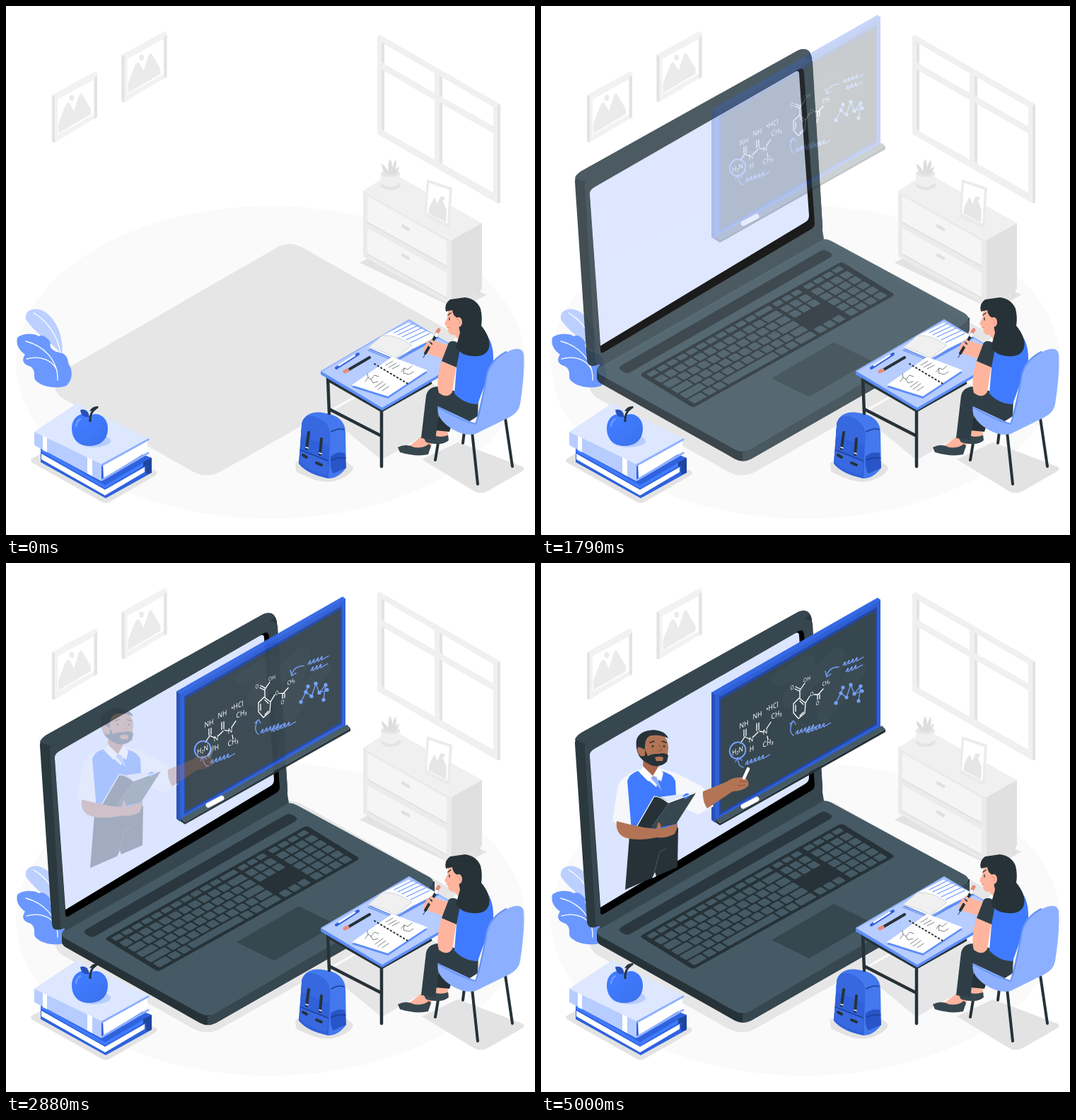
Animation, 748 px wide and 748 px high, one loop 5040 ms. Source, as an HTML page:

```html
<!DOCTYPE html>
<html lang="en">
<head>
<meta charset="utf-8">
<title>Online lesson</title>
<style>
html, body { margin: 0; height: 100%; overflow: hidden; background: #fff; }
svg { display: block; width: 100vw; height: 100vh; }
.line { fill: none; stroke-linecap: round; stroke-linejoin: round; }
text { font: 10.5px "Noto Sans", "Open Sans", sans-serif; fill: #fff; text-anchor: middle; }
</style>
</head>
<body>
<svg viewBox="0 0 748 748">
<defs>
  <g id="picture">
    <path fill="#f2f2f2" d="M65 126 125 93 129 94V157L69 193 65 192Z"/>
    <path fill="#e3e3e3" d="M65 126 69 128V193L65 192ZM125 101 129 98V157L125 160Z"/>
    <path fill="#fff" d="M73 132 124 104V153L73 182Z"/>
    <path fill="#ebebeb" d="M74 180V166L84 141Q88 133 91 139L96 149 103 127Q106 120 109 127L120 146V153Z"/>
    <ellipse cx="93" cy="130" rx="3.4" ry="4.2" fill="#ebebeb"/>
  </g>
  <linearGradient id="apple" x2="1" y2="1">
    <stop offset=".3" stop-color="#407bff"/><stop offset="1" stop-color="#3a70ea"/>
  </linearGradient>
</defs>

<!-- room -->
<ellipse cx="374" cy="504" rx="360" ry="221" fill="#fafafa"/>
<path fill="#e6e6e6" d="M77 518 382 342Q401 331 420 342L632 462Q640 468 632 473L304 658Q284 669 264 658L79 554Q60 540 77 518Z"/>
<path fill="#e6e6e6" d="M453 578 570 510 655 570 531 642Z"/>
<use href="#picture"/>
<use href="#picture" x="98.500" y="-57"/>
<path fill="#f0f0f0" fill-rule="evenodd" d="M525 43 529 41 699 139V278L695 279 525 181ZM535 54V82L606 123V95ZM535 92V177L606 217V133ZM617 101V129L689 170V143ZM617 139V223L689 264V180Z"/>
<path fill="#e3e3e3" d="M531 51 535 54V82L531 79ZM531 90 535 92V177L531 174ZM613 99 617 101V129L613 127ZM613 136 617 139V223L613 221ZM695 141 699 139V278L695 279Z"/>

<!-- cabinet -->
<path fill="#e3e3e3" d="M500 363 522 351 680 408 640 430Z"/>
<path class="line" stroke="#e0e0e0" stroke-width="6" d="M516 358V364M668 402V410"/>
<path fill="#f0f0f0" d="M505 261 546 236 673 307 631 331Z"/>
<path fill="#ebebeb" d="M505 261 630 331V424L505 354Z"/>
<path fill="#e0e0e0" d="M630 331 673 307V400L630 424Z"/>
<path fill="#f5f5f5" d="M511 269 623 332V367L511 305ZM511 314 623 377V412L511 350Z"/>
<path class="line" stroke="#e0e0e0" stroke-width="1.500" d="M511 306 623 368M511 351 623 413"/>
<path class="line" stroke="#e0e0e0" stroke-width="4.500" d="M561 311 569 316M561 352 569 357"/>
<ellipse cx="544" cy="253" rx="14" ry="7" fill="#e3e3e3"/>
<path fill="#f0f0f0" d="M530 237V250Q543 262 557 250V237Z"/>
<ellipse cx="543.500" cy="237" rx="13.500" ry="5" fill="#e6e6e6"/>
<path fill="#dedede" d="M538 238Q531 232 531 223Q538 227 541 237Q539 225 543 216Q548 225 545 237Q546 224 551 217Q554 229 547 237Q550 230 556 227Q555 235 548 239Z"/>
<path fill="#ebebeb" d="M595 245 631 257 627 315 592 298Z"/>
<path fill="#fff" d="M598 250 627 260 624 308 595 293Z"/>
<path fill="#e6e6e6" d="M597 293 599 283 606 270 610 280 615 268 623 289 622 306Z"/>
<circle cx="618" cy="272" r="2.500" fill="#e6e6e6"/>

<!-- plant -->
<path fill="#bcd0ff" d="M28 443C26 430 39 426 50 430C71 438 83 471 79 495C70 478 42 465 28 443Z"/>
<path fill="#6b98ff" d="M16 469C22 463 40 462 46 467C53 463 60 471 63 476C60 484 68 489 76 490C87 492 87 500 89 507C95 516 94 530 85 537C75 541 55 540 45 532C35 526 45 518 35 510C23 506 22 500 27 493C17 485 14 478 16 469Z"/>
<path class="line" stroke="#fff" stroke-width="1.300" d="M39 434C60 446 73 468 77 490M28 474C52 480 74 500 73 529M29 499C50 493 66 502 72 515"/>

<g id="laptop">
  <path fill="#263238" d="M79 520V533Q80 538 86 541L274 647Q285 653 297 647L598 475Q606 471 606 461V447Z"/>
  <path fill="#37474f" d="M285 638 606 450V461Q606 471 598 475L297 647Q291 650 285 650Z"/>
  <path fill="#455a64" d="M84 514 389 339Q400 333 411 339L599 441Q610 448 598 456L297 633Q285 640 273 633L84 528Q74 521 84 514Z"/>
  <path fill="#2a373e" d="M113 515 395 353Q400 350 405 353L410 356Q413 359 409 362L127 524Q122 527 117 524L112 521Q109 518 113 515Z"/>
  <g id="keys" transform="matrix(15.050 -8.420 12.670 7.800 139 528)"><rect width="19" height="6" rx=".3" fill="#263238"/></g>
  <path fill="#37474f" d="M326 533 414 482 467 508 379 559Z"/>
  <path fill="#37474f" d="M77 500 397 318 400 336 84 517Z"/>
  <path fill="#2b393f" d="M48 256Q47 247 57 240L364 69Q379 63 383 79L398 317Q399 328 391 333L82 513Q67 520 65 508Z"/>
  <path fill="#37474f" d="M62 262Q61 255 68 250L365 83Q378 76 384 85L398 317Q399 328 391 333L82 513Q77 516 77 508Z"/>
  <path fill="#37474f" d="M48 250Q49 245 57 240L364 69Q375 65 380 72L373 80 62 255Z"/>
  <path fill="#000" d="M69 274Q68 267 75 263L363 97Q371 92 372 101L387 314Q387 319 382 322L89 496Q84 499 84 493Z"/>
  <path fill="#dbe5ff" d="M69 274Q68 267 75 263L360 99Q365 97 365 103L379 303Q379 309 374 312L84 487Z"/>
</g>

<g id="board">
  <path fill="#3468e4" d="M241 183 476 49 480 52V232L246 367 241 363Z"/>
  <path fill="#2850b8" d="M241 183 246 187V367L241 363Z"/>
  <path fill="#2f5fd6" d="M246 187 480 53V232L246 366Z"/>
  <path fill="#2348a8" d="M252 190 475 62V229L252 357Z"/>
  <path fill="#37474f" d="M254 193 473 67V227L254 353Z"/>
  <path class="line" stroke="#435159" stroke-width="20" opacity=".4" d="M335 165 378 140 350 195 420 130 400 215 450 150"/>
  <path fill="#455a64" d="M247 363 482 230 487 235 253 368Z"/>
  <path fill="#263238" d="M247 363 253 368 487 235V239L253 371 247 367Z"/>
  <path class="line" stroke="#fff" stroke-width="7" d="M286 344 305 334"/>
  <path class="line" stroke="#fff" stroke-width="1.300" d="M287 236V245M290 235V244M288 246 282 255M289 246 295 249M300 246 307 239M305 227V237M308 226V236M309 238 315 239M319 234 325 225M320 245 321 250
    M365 191 357 199 357 212 364 220 373 212 374 198ZM360 201V210M366 216 371 211M371 200 366 195M366 191V180L373 170M365 181 359 178M366 178 360 175M374 198 380 188M386 186 392 186 399 178M391 187V193M394 186V192"/>
  <g id="labels"></g>
  <g id="notes" class="line" stroke="#76a0ff" stroke-width="1.300">
    <ellipse cx="278" cy="265" rx="11" ry="12" transform="rotate(30 278 265)" stroke-width="2"/>
    <path d="M286 289Q279 288 278 276M275 281 278 275 284 279M357 244Q349 238 356 224M352 228 357 223 360 228M421 147Q408 147 404 159M402 153 404 161 410 157"/>
    <path d="M417 198 424 184 432 190 438 172 443 185 452 174 449 195M424 184 427 176M443 185 454 181"/>
  </g>
  <g id="atoms" fill="#76a0ff"></g>
</g>

<g id="teacher">
  <path fill="#263238" d="M125 386 194 374 193 430 160 444 119 462Z"/>
  <path fill="#dbe5ff" d="M157 446 161 437 163 443Z"/>
  <path class="line" stroke="#455a64" d="M160 438 168 408 177 404"/>
  <path fill="#f5f7fa" d="M143 291Q118 298 109 314L101 365Q112 372 128 369L129 390Q165 387 193 373V344Q208 348 222 356L244 344Q236 316 214 309 196 298 171 291Z"/>
  <path fill="#a8674c" d="M145 270 166 280 167 300 158 307 144 290Z"/>
  <path fill="#407bff" d="M137 294Q125 298 122 308L129 390Q160 387 193 374L190 308Q186 298 170 294L163 317Z"/>
  <path fill="#fff" d="M144 287 140 297 152 309 159 301 170 309 173 297 166 288 158 301Z"/>
  <path fill="#8aaeff" d="M155 303 163 302 171 322 164 314Z"/>
  <path fill="#b27455" d="M141 253Q148 241 166 241 180 244 180 262L178 279Q170 288 159 284L147 275Z"/>
  <path fill="#263238" d="M141 276Q133 266 135 250 139 237 159 236 176 237 180 248 169 242 155 244 146 247 147 264L151 273Q160 269 166 270 175 267 180 272L178 281Q168 290 156 286 146 281 141 276Z"/>
  <path fill="#b27455" d="M141 261Q134 258 137 268 141 276 147 272V264Z"/>
  <path fill="#b27455" d="M161 275Q167 272 173 275L172 280H163Z"/>
  <path class="line" stroke="#263238" stroke-width="1.600" d="M154 254 160 252M171 252 177 254"/>
  <path class="line" stroke="#8d513a" d="M167 257 171 265 166 266"/>
  <circle cx="158" cy="259" r="1.500" fill="#263238"/><circle cx="174" cy="259" r="1.500" fill="#263238"/>
  <path fill="#dfe8ff" d="M160 332 218 324 191 366 136 374Z"/>
  <path fill="#263238" d="M160 330Q168 328 181 339L154 377Q143 374 134 375Z"/>
  <path fill="#37474f" d="M181 339 219 325 191 369 154 377Z"/>
  <path fill="#407bff" d="M200 330Q207 322 211 329L204 334Z"/>
  <path class="line" stroke="#fff" stroke-width="1.200" d="M134 375 160 330Q169 330 180 339L218 325"/>
  <path fill="#b27455" d="M107 365Q125 370 146 374L163 376 166 366Q171 370 169 376L192 369Q194 373 189 383 177 390 164 388 136 394 118 388 105 382 107 365Z"/>
  <path fill="#b27455" d="M229 323 263 309Q271 302 286 303 295 306 293 315 287 322 271 323L235 347Q228 337 229 323Z"/>
  <path class="line" stroke="#8d513a" d="M281 309 290 309M279 315 289 314"/>
  <path class="line" stroke="#fff" stroke-width="4.500" stroke-linecap="butt" d="M287 304 293 291"/>
</g>

<!-- books and apple -->
<path fill="#e3e3e3" d="M35 641 101 604 213 658Q215 661 211 664L145 702Q140 704 135 701L36 645Z"/>
<path fill="#2f62de" d="M49 626 101 598 206 639V660L141 696 49 645Z"/>
<path fill="#fff" d="M50 633 140 684 196 652V659L140 692 50 641Z"/>
<path class="line" stroke="#407bff" stroke-width="4" d="M51 629 140 680 203 643"/>
<path fill="#1f459f" d="M194 645 206 639V660L198 662V650L194 652Z"/>
<path fill="#fff" d="M137 647 200 614V630L138 668Z"/>
<path fill="#b7ccff" d="M40 602 135 647V672L40 621Z"/>
<path fill="#fff" d="M52 607 58 610V631L52 628ZM115 637 122 641V665L115 661Z"/>
<path fill="#dde7ff" d="M40 602 97 564Q100 562 104 563L202 612 135 648Z"/>
<path class="line" stroke="#8fb1ff" stroke-width="3" d="M136 670 201 632M136 649 201 613"/>
<ellipse cx="124" cy="615" rx="24" ry="9" fill="#b7ccff"/>
<path fill="url(#apple)" d="M118 580C129 572 144 581 144 597C144 613 134 622 118 622C102 622 93 612 93 597C93 581 107 572 118 580Z"/>
<path class="line" stroke="#729dff" stroke-width="2.500" d="M99 594Q100 587 105 584"/>
<path fill="#2850b8" d="M105 571Q116 568 118 581Q106 583 105 571Z"/>
<path fill="none" stroke="#263238" stroke-width="3" d="M119 588Q118 573 130 567"/>
<path fill="#263238" d="M118 573Q122 565 131 566L126 572Z"/>

<!-- backpack -->
<path fill="#e3e3e3" d="M409 646Q430 632 470 635L491 652Q490 663 467 671 446 678 410 658Z"/>
<path fill="#4378ee" d="M418 594C419 578 433 573 447 575C467 577 480 586 480 603L481 653Q470 668 456 668Q426 662 414 647Z"/>
<path fill="#3061da" d="M418 594C418 580 430 577 441 583C456 589 460 600 458 617L456 668Q426 662 414 647Z"/>
<path fill="#3768e0" d="M418 593C419 579 433 575 447 586C459 594 459 607 457 622L417 607Z"/>
<path fill="#3969e0" d="M417 626 453 641Q456 642 455 655L453 663Q428 658 416 645Z"/>
<path fill="#2855c7" d="M459 637Q468 629 479 632L481 653 463 661Q458 656 459 637Z"/>
<path class="line" stroke="#1c3f96" stroke-width="1.500" d="M460 642Q470 638 480 639M417 628 455 643M460 602Q471 596 478 599"/>
<path class="line" stroke="#263238" stroke-width="4" d="M428 603 425 626M446 612 444 634M420 635 425 638M439 646 446 649"/>
<path class="line" stroke="#fff" stroke-width="1.500" d="M424 624 427 625M443 632 446 633"/>

<!-- desk -->
<path class="line" stroke="#263238" stroke-width="4.500" d="M455 525 457 576M531 568V651M457 570 531 608M458 530 531 572 600 533"/>
<path fill="#5d8dfa" d="M445 516 532 567 657 494V499L532 572 445 521Z"/>
<path fill="#b7ccff" d="M445 516 570 443 657 495 532 568Z"/>
<path class="line" stroke="#8fb1ff" stroke-width="1.500" d="M447 516 570 444 640 486"/>
<path fill="#5d8dfa" d="M511 487 569 449 613 469 551 503Z"/>
<path fill="#fff" d="M512 483 532 466 569 448 611 467 577 484 550 499Z"/>
<path fill="#f0f0f0" stroke="#c5cbd0" stroke-width=".8" d="M512 483 532 466Q552 464 574 480L550 498Q536 488 512 483Z"/>
<path class="line" stroke="#c5cbd0" d="M513 486 550 501 576 484"/>
<path class="line" stroke="#6b98ff" stroke-width="1.200" d="M549 462 575 449M554 465 582 452M560 468 588 455M566 472 594 459M572 476 599 463"/>
<path fill="#5d8dfa" d="M489 539 544 500 596 518 540 555Z"/>
<path fill="#fff" d="M489 536 546 496 596 515 540 552Z"/>
<path class="line" stroke="#263238" stroke-width="2" stroke-dasharray="1.300 4" d="M521 506 568 534"/>
<path class="line" stroke="#263238" stroke-width=".6" d="M508 531 512 525 516 528 521 522 527 524M512 525 511 520M516 528 519 533 526 531M522 539 533 531M526 542 537 534M532 544 541 538M537 508 547 502M541 511 552 505M546 513 556 508M559 517 563 512 568 514 574 509M563 512 562 519 570 521 576 517"/>
<path class="line" stroke="#2f62de" stroke-width="4" d="M467 512 498 492"/>
<path class="line" stroke="#fff" stroke-width="2.500" d="M471 508 493 494"/>
<path class="line" stroke="#263238" stroke-width="4" d="M485 514 514 497"/>
<path class="line" stroke="#e58b7b" stroke-width="5" d="M479 517 483 515"/>

<!-- student and chair -->
<path fill="#e3e3e3" d="M588 641 639 617 732 652Q734 656 728 659L681 686Q671 691 662 686Z"/>
<path class="line" stroke="#263238" stroke-width="4" d="M616 588 607 642M648 602 646 618M706 583 716 651"/>
<path fill="#ffb59d" d="M587 609 605 610 600 626 568 624ZM606 597 624 601 626 610 607 612Z"/>
<path fill="#37474f" d="M554 624Q566 618 577 624 591 626 598 619L601 622 597 634Q581 638 557 631ZM588 606 601 604Q609 612 625 607L626 614Q617 623 594 617Z"/>
<path fill="#263238" d="M618 557 640 562 627 602 606 600Z"/>
<path fill="#2f3e46" d="M594 551Q597 537 615 538L668 556 667 580 648 592 612 576 607 614 587 611Z"/>
<path fill="#407bff" d="M640 476 675 460Q690 474 689 502L667 563Q648 563 634 548Z"/>
<path fill="#ffb59d" d="M627 480 607 474 594 478Q588 484 592 490L601 493 621 500ZM617 499 637 507 631 546Q624 556 612 547 607 530 617 499Z"/>
<path fill="#2f3e46" d="M626 476Q632 471 640 477L641 490 637 511 616 502Z"/>
<path class="line" stroke="#263238" stroke-width="4" d="M593 491 609 464"/>
<path class="line" stroke="#e58b7b" stroke-width="5" d="M610 461 612 458"/>
<path class="line" stroke="#fff" stroke-width="4" stroke-linecap="butt" d="M608 466 609 464"/>
<path class="line" stroke="#263238" d="M590 497 593 492"/>
<path class="line" stroke="#ffb59d" stroke-width="4" d="M596 476 602 482M601 473 608 479"/>
<path fill="#ffb59d" d="M626 426 644 426 648 458 640 472 634 465Q625 466 625 456L620 449 624 441Z"/>
<path fill="#263238" d="M622 432Q619 421 628 415L649 412Q665 414 671 428 674 440 672 452 686 469 683 483 679 497 659 495 644 494 636 483L642 462 638 441Q632 438 631 430Z"/>
<ellipse cx="640" cy="447" rx="5" ry="7" fill="#ffb59d"/>
<path class="line" stroke="#e98e7d" d="M638 443Q643 444 641 450M623 455 627 454"/>
<path class="line" stroke="#263238" stroke-width="1.300" d="M625 437 629 434M627 441V444"/>
<path class="line" stroke="#263238" stroke-width="4" d="M659 602 667 676"/>
<path fill="#8cb0ff" d="M611 566 664 591 681 516Q687 497 711 488 729 480 732 492 734 517 727 563 725 575 711 582L664 605Q648 609 629 597 607 582 611 566Z"/>
<path class="line" stroke="#6894f5" stroke-width="2" d="M611 567Q640 585 664 591 672 570 680 521 685 501 707 489"/>
</svg>

<script>
const LOOP = 5040;
const byId = id => document.getElementById(id);

function add(parent, tag, attrs, text = '') {
  const node = document.createElementNS('http://www.w3.org/2000/svg', tag);
  for (const name in attrs) node.setAttribute(name, attrs[name]);
  node.textContent = text;
  parent.append(node);
}

// Keyboard: main block, navigation cluster, number pad.
function key(x, y, width, height) {
  add(byId('keys'), 'rect', { x, y, width, height, rx: .1, fill: '#455a64' });
}
[.75, .75, 1.2, 1.5, 1.9, 1.2].forEach((first, row) => {
  const y = row ? .22 + row * .94 : .3;
  const h = row ? .76 : .55;
  for (let x = .4, w = first; x < 11.6;) {
    const end = x + w > 11 ? 11.9 : x + w;
    key(x, y, end - x, h);
    x = end + .16;
    w = row === 5 && x > 3 && x < 4.5 ? 4.8 : .76;
  }
  for (let col = 0; col < 4; col++) {
    if (col < 3 && (row < 3 || row === 5)) key(12.2 + col * .87, y, .7, h);
    key(15.1 + col * .9, y, .74, h);
  }
});

const labels = [
  [287, 232, 'NH'], [306, 219, 'NH'], [327, 207, '•HCl'], [333, 218, 'CH₃'],
  [278, 269, 'H₂N'], [297, 253, 'N'], [317, 242, 'N'], [298, 266, 'H'], [321, 258, 'CH₃'],
  [376, 167, 'OH', .75], [355, 179, 'O', .75], [383, 188, 'O', .75],
  [403, 172, 'CH₃', .75], [391, 201, 'O', .75]
];
for (const [x, y, text, size = 1] of labels)
  add(byId('labels'), 'text', { transform: `matrix(${.82 * size} ${-.36 * size} 0 ${size} ${x} ${y})` }, text);

for (const [cx, cy] of [[417, 198], [424, 184], [432, 190], [438, 172], [443, 185], [452, 174], [449, 195], [427, 176], [454, 181]])
  add(byId('atoms'), 'circle', { cx, cy, r: 2.6 });

// Cursive notes rising along the board.
function scribble(x, y, letters) {
  const d = `M${x} ${y}` + 'q4 -8 3.500 -4q-2.500 6 2 2'.repeat(letters) + 'l7 -4';
  add(byId('notes'), 'path', { d });
}
scribble(289, 285, 5);
scribble(360, 242, 5);
scribble(375, 240, 5);
scribble(427, 145, 4);
scribble(431, 154, 3);

// Cubic bezier (.36, -.01, .5, 1.38): eases in and overshoots slightly.
function ease(x) {
  if (x <= 0) return 0;
  if (x >= 1) return 1;
  const curve = (s, a, b) => 3 * s * (1 - s) ** 2 * a + 3 * s * s * (1 - s) * b + s ** 3;
  let low = 0, high = 1;
  for (let i = 0; i < 24; i++) {
    const mid = (low + high) / 2;
    if (curve(mid, .36, .5) < x) low = mid; else high = mid;
  }
  return curve(low, -.01, 1.38);
}

// "settle" is how long the last fifth, the return from the overshoot, takes.
const parts = [
  { node: byId('laptop'), start: 560, rise: 1680, settle: 1200, drop: 60 },
  { node: byId('board'), start: 1000, rise: 2320, settle: 600, drop: 50 },
  { node: byId('teacher'), start: 1900, rise: 2650, settle: 450, drop: 45 }
];

function draw() {
  const time = performance.now() % LOOP;
  for (const { node, start, rise, settle, drop } of parts) {
    const t = time - start;
    const p = ease(t < rise ? .8 * t / rise : .8 + .2 * (t - rise) / settle);
    node.setAttribute('opacity', Math.min(1, Math.max(0, p)));
    node.setAttribute('transform', `translate(0 ${(p - 1) * drop})`);
  }
  requestAnimationFrame(draw);
}
draw();
</script>
</body>
</html>
```
